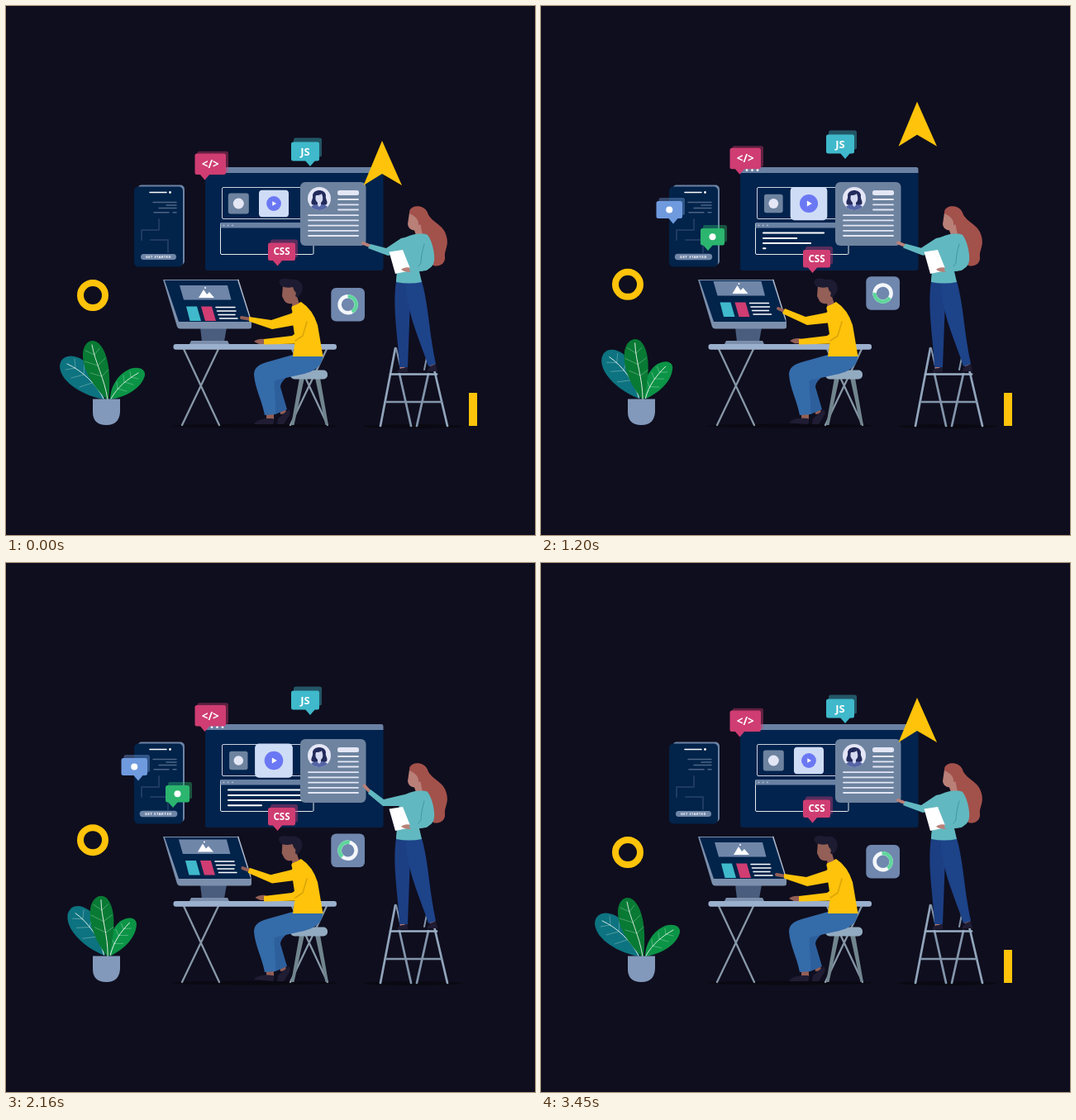
These frames come from a looping animation (640x640 px, 3510 ms). An HTML page:

```html
<!DOCTYPE html>
<html lang="en">
<head>
<meta charset="utf-8">
<style>
html, body { margin: 0; width: 100%; height: 100%; overflow: hidden; background: #0f0e1e; }
svg { display: block; width: 100vw; height: 100vh; }
text { font-family: "Open Sans", "Noto Sans", sans-serif; font-weight: 700; fill: #fff; text-anchor: middle; }
.line { fill: none; stroke-linecap: round; stroke-linejoin: round; }
.vein { fill: none; stroke: #e8f4ee; stroke-width: .9; stroke-linecap: round; }
.vein .thin { stroke-width: .5; opacity: .6; }
</style>
</head>
<body>
<svg viewBox="0 0 640 640">
  <defs>
    <clipPath id="screenClip"><path d="M192 332H280L296 382H209Z"/></clipPath>
    <clipPath id="avatarClip"><circle cx="379" cy="233" r="14"/></clipPath>
    <path id="trestle" d="M215 415L258 507M257 415L213 507"/>
  </defs>

  <g fill="#0a0912">
    <ellipse cx="301" cy="508" rx="100" ry="2.5"/>
    <ellipse cx="492" cy="508.500" rx="60" ry="2.5"/>
  </g>

  <!-- phone -->
  <rect x="159" y="216.500" width="57" height="97" rx="5" fill="#6d83a4"/>
  <rect x="155" y="218.500" width="59" height="97" rx="5" fill="#02234a"/>
  <path class="line" stroke="#fff" stroke-width="1.6" d="M174 225.500H194"/>
  <circle cx="198.500" cy="225.500" r="1.4" fill="#fff"/>
  <path class="line" stroke="#4d6485" stroke-width="1.5" d="M178 237.500H206M194 241H206M185 244.500H206M179 249.700H197M202 249.700H206"/>
  <path class="line" stroke="#1f3b63" stroke-width="2" d="M164 283V271H185V258M175 283H196V298"/>
  <g id="start">
    <rect x="163" y="300" width="43" height="7" rx="3.5" fill="#6f86a8"/>
    <text x="184.500" y="305.100" font-size="4" letter-spacing=".5">GET STARTED</text>
  </g>

  <!-- board -->
  <path d="M241 200H456.500V317Q456.500 320 453 320H244Q241 320 241 317Z" fill="#02234d"/>
  <path d="M241 202V198Q241 195 244 195H454Q456.500 195 456.500 198V202Z" fill="#6a81a3"/>
  <path class="line" stroke="#fff" stroke-width="2.800" d="M249 198.500h.01M255.500 198.500h.01M262 198.500h.01"/>
  <rect x="261.500" y="219.500" width="110" height="38" rx="1.500" fill="none" stroke="#dfe5f0" stroke-width=".9"/>
  <rect x="259.500" y="262.500" width="112.500" height="38" rx="1.500" fill="none" stroke="#fff" stroke-width=".9"/>
  <path d="M259.500 262H372V268.500H259.500Z" fill="#6a81a3"/>
  <path class="line" stroke="#bcc8d8" stroke-width="1.800" d="M263.500 265.300h.01M268.700 265.300h.01M274 265.300h.01"/>
  <path id="code" class="line" stroke="#fff" stroke-width="2.100"/>
  <g id="photo">
    <rect x="268.800" y="226.500" width="25" height="25" rx="3" fill="#6d839f"/>
    <circle cx="281.300" cy="239" r="6.500" fill="#e3e6f5"/>
  </g>
  <g id="video">
    <rect x="306" y="222.800" width="36" height="32.500" rx="4" fill="#cfdcf6"/>
    <circle cx="324" cy="239" r="8.900" fill="#6b78f3"/>
    <path d="M322.300 236.200L327 239L322.300 241.800Z" fill="#fff"/>
  </g>
  <g id="card">
    <rect x="356" y="213" width="79.500" height="77" rx="6" fill="#6d839f"/>
    <circle cx="379" cy="233" r="14" fill="#e4e6f7"/>
    <g clip-path="url(#avatarClip)">
      <path d="M370 240C368 236 372 234 371 229C372 221 386 221 387 229C386 234 390 236 388 240Q379 244 370 240Z" fill="#232b5c"/>
      <path d="M367 248C368 241 373 240 379 240C385 240 390 241 391 248Z" fill="#5565a5"/>
      <path d="M375 229Q380 229 382 227Q385 235 381 238V241L379 243L377 241V238Q373 234 375 229Z" fill="#d5d9f1"/>
    </g>
    <rect x="401" y="223" width="26" height="6" rx="2.500" fill="#e3e6f5"/>
    <path class="line" stroke="#e3e6f5" stroke-width="1.800" d="M402 234H426M402 240.300H426M402 246.500H426M366 253.200H426M366 259.400H426M366 265.600H426M366 271.800H426M366 278H426"/>
  </g>

  <g id="bubbles"></g>
  <path id="pointer" d="M455 163L479 217L455 203L432.500 217Z" fill="#fec30a"/>
  <circle id="ring" cx="105" cy="350" r="15" fill="none" stroke="#fec30a" stroke-width="8"/>
  <rect id="caret" x="560" y="468" width="10" height="40" fill="#fec30a"/>

  <g id="gauge">
    <rect x="393.300" y="341" width="40.700" height="40.500" rx="6" fill="#7087ae"/>
    <g id="dial" fill="none" stroke-width="4.500">
      <circle cx="413.600" cy="361.300" r="10" stroke="#f4f7fa"/>
      <path d="M413.600 351.300A10 10 0 0 1 418.600 370" stroke="#5fd69c"/>
    </g>
  </g>

  <!-- plant -->
  <g id="leafLeft">
    <path d="M119 476C95 472 66 456 65 436C66 423 78 421 89 426C105 434 118 455 119 476Z" fill="#0d7380"/>
    <g class="vein"><path d="M74 433C92 441 109 457 118 475"/><path class="thin" d="M84 438L83 427M84 438L72 440M94 446L95 433M94 446L79 450M104 456L106 443M104 456L89 461"/></g>
  </g>
  <g id="leafRight">
    <path d="M126 476C126 462 134 446 150 439C160 436 169 439 168 447C164 462 146 473 126 476Z" fill="#0b9446"/>
    <g class="vein"><path d="M160 444C146 452 135 461 127 475"/><path class="thin" d="M151 449L150 442M151 449L160 451M143 455L142 447M143 455L154 458M135 463L134 455M135 463L146 466"/></g>
  </g>
  <g id="leafMid">
    <path d="M123 477C107 462 92 441 93 420C94 407 104 401 112 408C125 420 127 450 124 477Z" fill="#087a34"/>
    <g class="vein"><path d="M104 410C108 432 119 450 123 476"/><path class="thin" d="M107 422L113 414M107 422L96 417M111 435L120 426M111 435L95 430M116 448L124 440M116 448L102 444"/></g>
  </g>
  <path d="M105 475.500H138V491Q137 507 121.500 507Q105 507 105 491Z" fill="#8299bb"/>

  <!-- desk and stool -->
  <g class="line" stroke="#8798a8" stroke-width="2.300"><use href="#trestle"/><use href="#trestle" x="131"/></g>
  <path d="M355 450H361L348.500 507H345ZM374 450H380L390 507H386.500Z" fill="#71858f"/>
  <rect x="202.500" y="409" width="197.500" height="6.700" rx="3" fill="#9bb0cc"/>
  <rect x="344" y="440.500" width="45" height="11" rx="5" fill="#93abc0"/>

  <!-- monitor -->
  <path d="M235 389H267L264 406H237Z" fill="#4a5d7e"/>
  <path d="M224 405H268L270 409H222Z" fill="#7b8fac"/>
  <path d="M190 331H281L297 382V388Q297 390.500 294 390.500H211Q208 390.500 207 388Z" fill="#7b8fac"/>
  <path d="M192 332H280L296 382H209Z" fill="#02234a"/>
  <path d="M281 331L296 379" class="line" stroke="#dfe5f0" stroke-width=".8"/>
  <g clip-path="url(#screenClip)"><g id="page">
    <path d="M210 338H268L272.500 355.500H215Z" fill="#6f86a8"/>
    <path d="M233 353L239 343L243 349L246 346L252 353Z" fill="#fff"/><circle cx="241" cy="341" r="1" fill="#fff"/>
    <path d="M218 363.500H231L236 381H222.500Z" fill="#3fb9cb"/>
    <path d="M236 363.500H249L254 381H241Z" fill="#cf3d72"/>
    <path class="line" stroke="#fff" stroke-width="1.500" d="M254 364.500H277M255.500 369H278M257 373.500H277M258.500 378H280"/>
  </g></g>

  <!-- seated man -->
  <path d="M315 492H324V500H315ZM331 487L338 486L339 493L332 494Z" fill="#935f56"/>
  <path d="M329 499L342 488Q345 491 343 495L336 506H328Z" fill="#1f1c33"/>
  <path id="foot" d="M300 506Q302 501 314 499H323Q325 503 323 506Z" fill="#1f1c33"/>
  <path d="M322 446L350 440C338 450 332 455 332 461L340 488L326 494L314 456Z" fill="#2d5f9d"/>
  <path d="M347 422H383C384 436 372 443 356 446L325 453C324 466 327 480 326 494L313 495C310 478 301 462 300 446C300 438 305 434 315 431Z" fill="#346ba9"/>
  <path d="M346 363L357 358Q371 367 377 386L383.500 424H347L350 404L347 384Z" fill="#fec30a"/>
  <path id="typing" d="M300 406Q305 402 313 403V409H306Z" fill="#935f56"/>
  <path d="M312 403L346 399L364 386L373 396Q364 407 353 408.500L312 409.500Z" fill="#fec30a"/>
  <path class="line" stroke="#dba50a" stroke-width="1.600" d="M364 382L359 399L350 405"/>
  <path id="touch" class="line" stroke="#935f56" stroke-width="4"/>
  <path id="sleeve" fill="#fec30a"/>
  <g id="manHead">
    <path d="M335 338H349L352 351L355 361L347 366L346 360Q338 361 336 355L334 351Z" fill="#935f56"/>
    <path d="M331 336C329 329 337 329 345 331C356 329 361 338 358 346L353 353L350 351Q352 346 349 345L347 340Q340 342 333 339Z" fill="#1d1b31"/>
  </g>
  <path class="line" stroke="#fec30a" stroke-width="7" d="M349 366L356 363"/>

  <!-- ladder -->
  <g class="line" stroke="#8295ab" stroke-width="2.700">
    <path d="M471 414L453 508M512 414L534 508" stroke="#91a5bb"/>
    <path d="M476 445L490 508M511 445L497 508"/>
    <path d="M460 479H527" stroke-width="2.300"/>
    <path d="M465 445.500H521" stroke="#9bb0c6"/>
    <path d="M472 414L478 440M511 416L506 440" stroke-width="2"/>
  </g>

  <!-- standing woman -->
  <path d="M477 432H486V440H477ZM511 431L518 430L520 437L514 438Z" fill="#b87a70"/>
  <path d="M473 443Q475 438 481 438L486 436V443ZM509 442L513 436L520 433L522 442Z" fill="#201c33"/>
  <path d="M472 333H494L489 355C488 385 487 410 486 437H476C475 405 467 365 472 333Z" fill="#1c3f84"/>
  <path d="M484 333H503C511 360 511 390 520 433L511 436C503 410 488 380 484 345Z" fill="#1d4389"/>
  <g id="womanHead">
    <path d="M488 248C491 240 506 240 510 250C514 262 530 264 533 279C536 290 530 296 531 303C532 312 524 316 517 314C508 304 516 290 503 276Z" fill="#a3514b"/>
    <path d="M488 250L486 264Q487 271 494 271.500L497 280L504 277L501 262Q500 251 488 250Z" fill="#b98078"/>
    <path d="M488 249Q497 245 501 253L502 264L499 265Q500 256 488 251Z" fill="#a3514b"/>
  </g>
  <path d="M482 281C489 276 504 274 510 277C516 285 519 300 518 308C517 318 508 320 500 321L503 334Q488 337 472 334C472 320 477 310 475 296Z" fill="#62b8c0"/>
  <path class="line" stroke="#3f929c" stroke-width=".9" d="M506 288Q502 302 502 311L498 316"/>
  <path id="reach" class="line" stroke="#b98078" stroke-width="4"/>
  <path id="arm" fill="#62b8c0"/>
  <g id="paper">
    <path d="M463.500 297.500L480 295L490 320L471 324Z" fill="#fff"/>
    <path d="M478 319Q482 315 491 317L490 322Q482 322 478 319Z" fill="#b98078"/>
  </g>
  <path id="forearm" class="line" stroke="#62b8c0" stroke-width="6"/>
</svg>
<script>
const LOOP = 3510;
const el = id => document.getElementById(id);
const set = (id, name, value) => el(id).setAttribute(name, value);
const clamp = x => Math.min(1, Math.max(0, x));
const ease = (t, a, b) => { const x = clamp((t - a) / (b - a)); return x * x * (3 - 2 * x); };
const mix = (a, b, k) => a + (b - a) * k;
const swing = t => (1 - Math.cos(2 * Math.PI * t / LOOP)) / 2;
const move = (id, x, y) => set(id, 'transform', `translate(${x} ${y})`);
const turn = (id, deg, x, y) => set(id, 'transform', `rotate(${deg} ${x} ${y})`);
const zoom = (id, k, x, y, deg = 0) =>
  set(id, 'transform', `translate(${x} ${y}) rotate(${deg}) scale(${k}) translate(${-x} ${-y})`);
// Blends two point lists into one polyline.
const limb = (id, from, to, k) =>
  set(id, 'd', 'M' + from.map((v, i) => mix(v, to[i], k)).join(' '));

function bubble(id, x, y, w, h, tail, lift, color, label, size) {
  const mark = label
    ? `<text x="${x + w / 2}" y="${y + h / 2 + size * .36}" font-size="${size}">${label}</text>`
    : `<circle cx="${x + w / 2}" cy="${y + h / 2}" r="4" fill="#fff"/>`;
  const box = (dx, dy, opacity) =>
    `<rect x="${x + dx}" y="${y + dy}" width="${w}" height="${h}" rx="2.5" opacity="${opacity}"/>`;
  return `<g id="${id}" fill="${color}">${box(3, -lift, .42)}${box(0, 0, 1)}
    <path d="M${tail - 6} ${y + h - .5}h12l-6 7z"/>${mark}</g>`;
}
el('bubbles').innerHTML =
  bubble('tag', 228.5, 178.5, 37.5, 25.5, 240.5, 2.7, '#cf3d72', '&lt;/&gt;', 13.5) +
  bubble('js', 345, 164.5, 34, 23, 368, 5, '#3fb9cb', 'JS', 13) +
  bubble('css', 317, 286.5, 33, 21.5, 328.5, 4, '#cf3d72', 'CSS', 11.6) +
  bubble('blue', 139.5, 236, 31.5, 21, 160, 4, '#6f9ade') +
  bubble('green', 193, 269, 29, 20.5, 202, 4, '#2bb56e');

function pop(id, t, inAt, outAt, x, y) {
  const grow = ease(t, inAt, inAt + 360);
  zoom(id, grow * (1 - ease(t, outAt, outAt + 300)), x, y, -75 * (1 - grow));
}

function drawPointer(t) {
  const bob = t < 930 ? 10 * Math.sin(Math.PI * t / 930) : 0;
  const fly = 47 * Math.pow(Math.max(0, t - 930) / 270, 1.63);
  const back = t > 2000;
  move('pointer', 0, back ? 0 : -Math.min(bob + fly, 76));
  set('pointer', 'opacity', back ? ease(t, 3000, 3330) : 1 - ease(t, 1260, 1330));
}

function drawCode(t) {
  const row = (y, start, rate, max) => {
    const length = Math.min(max, (t - start) * rate);
    return length > 0 ? `M269 ${y}h${length}` : '';
  };
  set('code', 'd', row(274.5, 543, .111, 98) + row(281, 764, .092, 98) +
    row(287, 673, .108, 98) + row(293.3, 1150, .048, 40));
  set('code', 'opacity', 1 - ease(t, 2750, 3200));
}

function draw(t) {
  const wave = swing(t), early = swing(t + 85);
  move('js', 0, -11.5 * wave);
  move('tag', 0, -8 * early);
  move('css', 0, 11 * wave);
  move('ring', 0, -17 * wave);
  move('gauge', 0, -16.5 * early);
  turn('dial', 360 * t / LOOP, 413.6, 361.3);
  turn('leafLeft', 13.5 * wave, 124, 477);
  turn('leafMid', 10.5 * wave, 124, 477);
  turn('leafRight', -18.5 * wave, 124, 477);
  zoom('video', 1 + .31 * wave, 324, 239);
  zoom('photo', 1 - .12 * wave, 281.3, 239);
  zoom('start', 1 + .07 * wave, 184.5, 303.5);
  pop('blue', t, 420, 2195, 163.5, 263);
  pop('green', t, 615, 2645, 200, 293.5);
  drawPointer(t);
  drawCode(t);

  const blink = t % (LOOP / 4);
  set('caret', 'opacity', blink > 335 && blink < 665 ? 0 : 1);

  const scroll = ease(t, 300, 750) * (1 - ease(t, 1950, 2550));
  move('page', -1.5 * scroll, -5 * scroll);
  limb('sleeve',
    [294, 376, 321, 380, 345, 372, 358, 362, 361, 384, 322, 391, 294, 381.5],
    [295, 366, 320, 376, 345, 371, 358, 362, 361, 382, 322, 386, 292, 372], scroll);
  limb('touch', [296, 379, 285, 377], [296, 370, 287, 366], scroll);
  turn('manHead', -3 * (1 - Math.cos(2 * Math.PI * t / 1170)), 350, 364);
  const tap = Math.max(0, Math.sin(2 * Math.PI * t / 234));
  move('typing', 1.5 * tap, -tap);
  turn('foot', 5 * tap, 323, 505);

  const point = ease(t, 1140, 1740) * (1 - ease(t, 2910, 3420));
  limb('arm',
    [441, 288, 460, 293, 478, 281, 492, 278, 488, 296, 462, 302, 438, 293],
    [441, 274, 457, 286, 478, 281, 492, 278, 488, 294, 456, 294, 438, 279], point);
  limb('reach', [441, 290.5, 432, 287], [440, 276.5, 433.5, 269.5], point);
  zoom('card', 1 - .032 * ease(t, 1680, 1830) * (1 - ease(t, 1890, 2070)), 396, 251.5);

  const read = ease(t, 350, 700) * (1 - ease(t, 850, 1180));
  set('paper', 'transform', `translate(${-3 * read} ${-11 * read}) rotate(${13 * read} 472 310)`);
  limb('forearm', [514, 311, 508, 317, 491, 319], [513, 304, 505, 315, 482, 309], read);
  turn('womanHead', -4 * read, 502, 277);
}

function frame(now) {
  draw(now % LOOP);
  requestAnimationFrame(frame);
}
requestAnimationFrame(frame);
</script>
</body>
</html>
```
